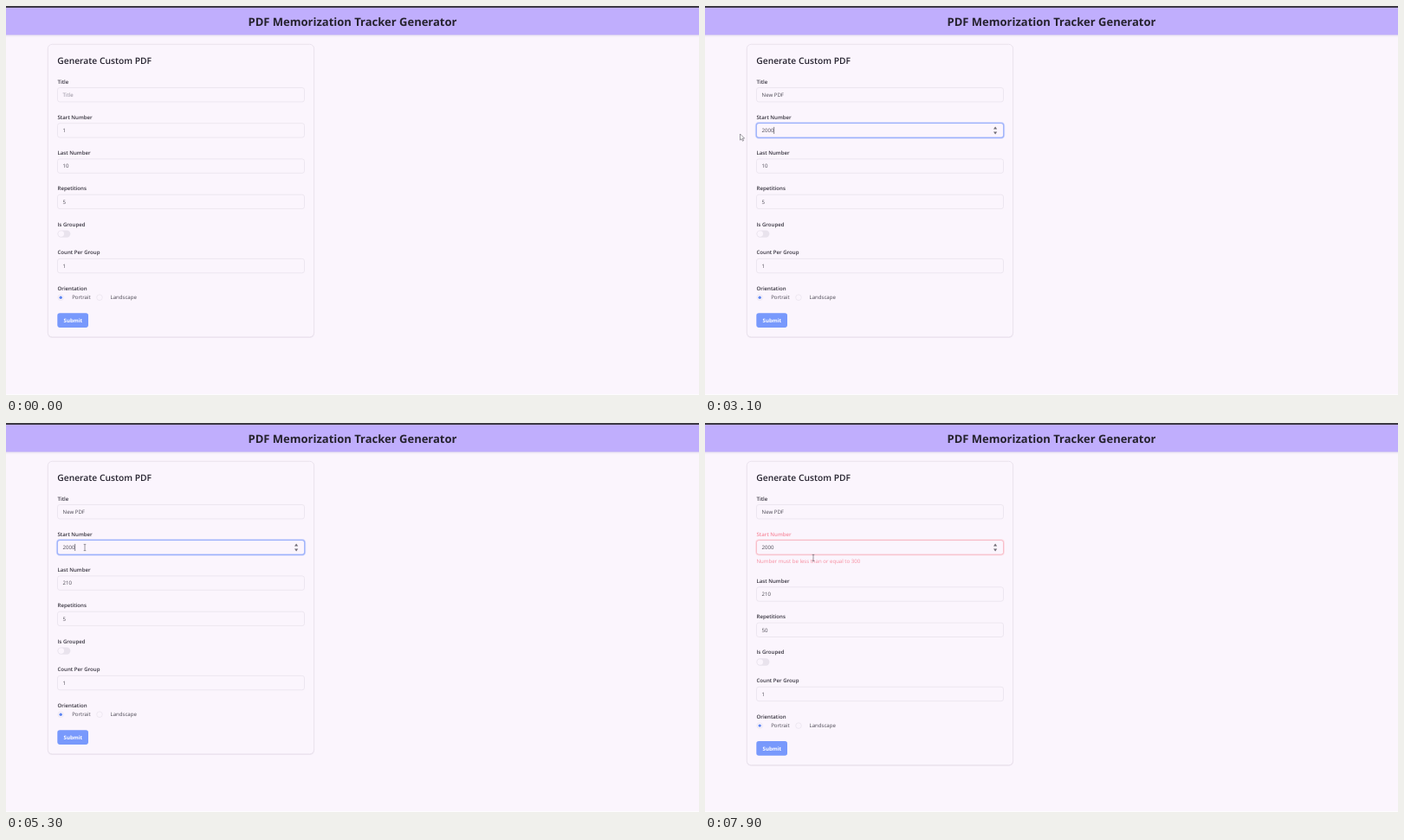
Recreate the animation shown at these times as an HTML page. Size 800x450 px, loop 8 s.

```html
<!DOCTYPE html>
<html lang="en">
<head>
<meta charset="utf-8">
<style>
  html, body { margin: 0; width: 100%; height: 100%; overflow: hidden; background: #fbf5fd; }
  svg { display: block; width: 800px; height: 450px; }
  text { font: 6.08px "Open Sans", "Noto Sans", sans-serif; fill: #4b4853; text-rendering: geometricPrecision; }
  .label { font-weight: 600; fill: #37343f; }
  .hint { fill: #8d8996; }
  .bad { fill: #f78d9f; }
  .note { font-weight: 500; }
  .white { fill: #fff; }
  .strong { font-weight: 700; }
  .h1 { font-size: 13px; font-weight: 700; fill: #25222e; text-anchor: middle; }
  .h2 { font-size: 10.28px; font-weight: 600; fill: #25222e; }
</style>
</head>
<body>
<svg id="stage" viewBox="0 0 800 450"></svg>
<script>
const LOOP = 8000, ERROR_AT = 7300, SHIFT = 12.9;
const LEFT = 59.5, RIGHT = 344.5, TEXT_X = 65.6;
const stage = document.getElementById('stage');
const pen = document.createElement('canvas').getContext('2d');
pen.font = '6.08px "Open Sans", "Noto Sans", sans-serif';

// [time, x, y]; the pointer is hidden before the first entry
const path = [
  [300, 190, 140], [700, 128.5, 101], [1900, 128.5, 101], [2200, 82, 144], [2300, 82, 144],
  [2500, 40.5, 148], [3300, 40.5, 148], [3900, 118.5, 181.5], [4700, 118.5, 181.5],
  [5000, 91, 144], [5500, 91, 144], [6000, 90, 226], [6500, 90, 226], [6800, 87, 297],
  [6900, 87, 297], [7200, 82, 364], [7400, 82, 364], [7800, 125, 156]
];
// [time, focused field, whether its text is selected]
const focusSteps = [
  [0, ''], [700, 'title'], [2200, 'start'], [2400, 'start', true], [2600, 'start'],
  [3900, 'last'], [4100, 'last', true], [4400, 'last'], [5000, 'start'],
  [6100, 'reps'], [7200, ''], [ERROR_AT, 'start']
];
const fields = [
  { id: 'title', label: 'Title', y: 102.7, first: '', text: 'New PDF', at: 1100, step: 110 },
  { id: 'start', label: 'Start Number', y: 143.9, first: '1', text: '2000', at: 2600, step: 100 },
  { id: 'last', label: 'Last Number', y: 185.1, first: '10', text: '210', at: 4400, step: 100 },
  { id: 'reps', label: 'Repetitions', y: 226.4, first: '5', text: '50', at: 6400, step: 100 },
  { id: 'count', label: 'Count Per Group', y: 300.6, first: '1', text: '1', at: LOOP, step: 100 }
];

const text = (x, y, s, cls = '') => `<text x="${x}" y="${y}" class="${cls}">${s}</text>`;
const rect = (x, y, w, h, r, fill, more = '') =>
  `<rect x="${x}" y="${y}" width="${w}" height="${h}" rx="${r}" fill="${fill}" ${more}/>`;
const circle = (x, y, r, fill, more = '') => `<circle cx="${x}" cy="${y}" r="${r}" fill="${fill}" ${more}/>`;
const shape = (d, more) => `<path d="${d}" ${more}/>`;
const latest = (steps, t) => steps.filter(s => s[0] <= t).pop();

function pointerAt(t) {
  const a = latest(path, t);
  if (!a) return null;
  const b = path.find(p => p[0] > t) || a;
  const k = b === a ? 0 : (t - a[0]) / (b[0] - a[0]);
  const e = k * k * (3 - 2 * k);
  return { x: a[1] + (b[1] - a[1]) * e, y: a[2] + (b[2] - a[2]) * e };
}

function valueAt(f, t) {
  return t < f.at ? f.first : f.text.slice(0, Math.floor((t - f.at) / f.step) + 1);
}

function drawField(f, t, y, focus, hover, failed) {
  const focused = focus[1] === f.id, bad = failed && f.id === 'start';
  const value = valueAt(f, t), width = pen.measureText(value).width;
  const box = (grow, attrs) => rect(LEFT - grow, y - 8.2 - grow, RIGHT - LEFT + 2 * grow, 16.4 + 2 * grow, 2.6 + grow, 'none', attrs);
  let out = text(LEFT, y - 13.2, f.label, bad ? 'label bad' : 'label');

  if (bad) out += box(.5, 'stroke="#fce3ea" stroke-width="1.8"') + box(.1, 'stroke="#f8b4c1" stroke-width=".9"');
  else if (focused) out += box(.6, 'stroke="#d6dbfd" stroke-width="2.2"') + box(.2, 'stroke="#9db1fb" stroke-width="1.2"');
  else out += box(0, 'stroke="#e9e2ed" stroke-width=".8"');

  const selected = focused && focus[2];
  if (selected) out += rect(TEXT_X, y - 4.3, width, 8.6, 0, '#5f8fea');
  out += text(TEXT_X, y + 2.3, value || 'Title', selected ? 'white' : value ? '' : 'hint');

  if (focused && !selected) {
    const typedAt = f.at + (f.text.length - 1) * f.step;
    const since = t >= f.at ? Math.max(focus[0], Math.min(t, typedAt)) : focus[0];
    if ((t - since) % 1060 < 530) out += rect(TEXT_X + width, y - 4, .6, 8, 0, '#33303b');
  }
  if (f.id !== 'title' && (focused || hover))
    out += shape(`M333 ${y - 1.5}l2.1-2.9 2.1 2.9zM333 ${y + 1.6}l2.1 2.9 2.1-2.9z`, 'fill="#706d76"');
  return out;
}

function drawPointer(p, beam) {
  const move = `transform="translate(${p.x} ${p.y})"`;
  return beam
    ? shape('M-1.3-3.6H1.3M0-3.6V3.6M-1.3 3.6H1.3', `${move} fill="none" stroke="#66636d" stroke-width=".65"`)
    : shape('M0 0V7.1L1.7 5.6 2.9 8.2 4.1 7.6 2.9 5.1H5.1Z', `${move} fill="#fff" stroke="#4b4853" stroke-width=".55"`);
}

function drawPage(t) {
  const failed = t >= ERROR_AT, drop = failed ? SHIFT : 0;
  const focus = latest(focusSteps, t), pointer = pointerAt(t);
  let beam = failed && pointer.y > 154 && pointer.y < 166 && pointer.x < 180;

  let out = rect(0, 0, 800, 450, 0, '#fbf5fd')
    + rect(0, 33, 800, 1.2, 0, '#ded5ee') + rect(0, 34.2, 800, 1.4, 0, '#f2ebf7')
    + rect(0, 0, 800, 33.3, 0, '#c0aefd') + rect(0, 0, 800, 2, 0, '#3b3842')
    + rect(0, 449.3, 800, .7, 0, '#fff')
    + text(400, 23, 'PDF Memorization Tracker Generator', 'h1')
    + rect(48, 44.9, 308, 339 + drop, 5, '#eee6f1')
    + rect(48.3, 44.3, 307.3, 338.6 + drop, 5, '#fbf5fd', 'stroke="#e6dfea" stroke-width=".8"')
    + text(59.3, 67.4, 'Generate Custom PDF', 'h2');

  for (const f of fields) {
    const y = f.y + (f.y > 150 ? drop : 0);
    const hover = !!pointer && pointer.x > LEFT && pointer.x < RIGHT && Math.abs(pointer.y - y) < 8.3;
    beam = beam || hover;
    out += drawField(f, t, y, focus, hover, failed);
  }
  if (failed) out += text(LEFT, 162.4, 'Number must be less than or equal to 300', 'bad note');

  const ring = 'stroke="#e9e2ed" stroke-width=".7"';
  out += `<g transform="translate(0 ${drop})">`
    + text(LEFT, 254.6, 'Is Grouped', 'label')
    + rect(59.4, 259.4, 15, 8.4, 4.2, '#e9e3ed') + circle(63.7, 263.6, 3.3, '#fbf5fd')
    + text(LEFT, 328.8, 'Orientation', 'label')
    + circle(63.2, 337.2, 3.3, 'none', ring) + circle(63.2, 337.2, 1.7, '#5d86f2')
    + text(76.2, 339.3, 'Portrait')
    + circle(108, 337.2, 3.3, 'none', ring) + text(120.5, 339.3, 'Landscape')
    + rect(59.3, 355.2, 35.7, 16.7, 2.8, '#7899fc')
    + text(66.6, 365.9, 'Submit', 'label white strong') + '</g>';

  return pointer ? out + drawPointer(pointer, beam) : out;
}

function frame(now) {
  stage.innerHTML = drawPage(now % LOOP);
  requestAnimationFrame(frame);
}
frame(0);
</script>
</body>
</html>
```
